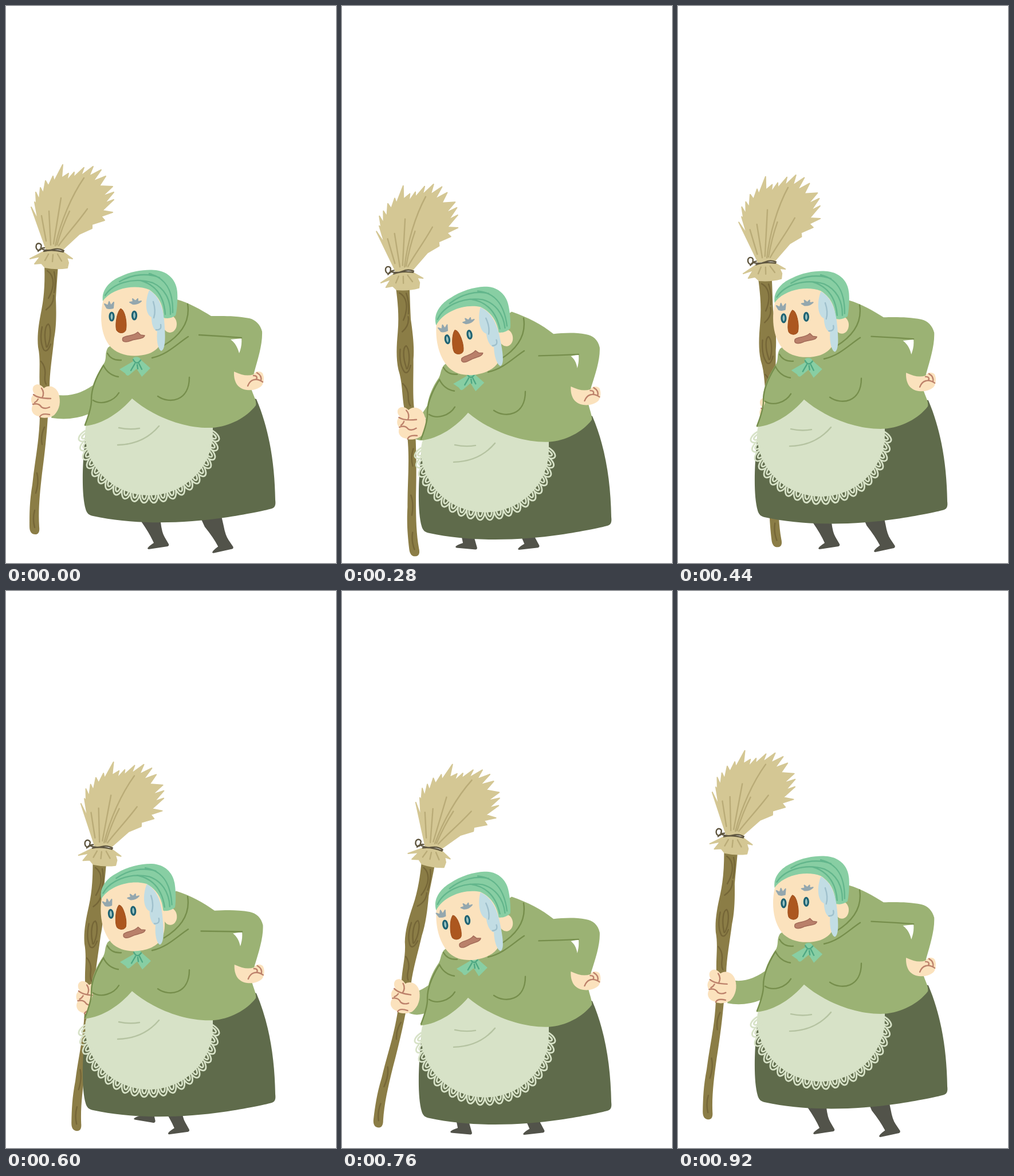
Animation of 576x972 px, one loop 0.96 s. Source, as an HTML page:

```html
<!DOCTYPE html>
<html lang="en">
<head>
<meta charset="utf-8">
<title>Walking with a broom</title>
<style>
html, body { margin: 0; width: 100%; height: 100%; overflow: hidden; background: #fff; }
svg { display: block; width: 100%; height: 100%; }
.line { fill: none; stroke-width: 2.4; stroke-linecap: round; stroke-linejoin: round; }
.skin { fill: #fbe2bd; }
.cloth { fill: #9bb274; }
.mint { fill: #88cea3; }
.fold { stroke: #768e4c; }
.crease { stroke: #bd826b; }
</style>
</head>
<body>
<svg viewBox="0 0 576 972" xmlns="http://www.w3.org/2000/svg">
  <defs>
    <path id="leg" fill="#52534a" d="M0 0Q0 -3 11 -10Q4 -26 -10 -46L-22 -78H18L23 -46Q25 -28 30 -20L37 -8Q38 -5 35 -4L2 1Z"/>
  </defs>

  <g id="broom">
    <path fill="#8b7d46" d="M67 450C68 480 67 505 62 530C57 555 54 575 56 595C61 618 57 640 59 665L59 717C58 760 50 795 46 835C41 865 41 885 41 908C41 918 45 922 51 922C57 922 59 917 58 909C56 880 59 850 63 815C67 785 71 750 73 717L76 665C76 640 81 610 84 580C88 560 88 535 87 510C88 490 90 470 91 450Z"/>
    <g class="line" stroke="#756637" stroke-width="2">
      <path d="M72 462Q84 470 82 488Q80 500 74 510M84 464Q88 480 84 500M70 530Q84 520 83 505"/>
      <path d="M70 592C66 575 68 557 74 555C79 560 78 580 74 590C72 596 70 597 70 592ZM63 560Q58 585 66 600Q72 606 78 590"/>
      <path d="M61 620Q70 630 68 645Q67 655 70 660M67 735Q60 750 63 765M54 815Q58 830 52 850M50 880Q46 895 50 910"/>
    </g>
    <g fill="#d4c794" stroke="#d4c794" stroke-width="2" stroke-linejoin="round">
      <path d="M70 424L60 396L44 351L56 374L50 342L53 346L52 325L58 338L60 317L65 327L69 305L74 314L82 297L84 306L99 277L97 300L109 292L106 305L119 290L118 299L136 282L131 296L152 280L145 297L166 286L152 306L174 297L163 314L186 315L168 332L188 325L172 344L188 338L168 357L186 360L166 367L172 374L150 381L150 388L128 398L100 424Z"/>
      <path d="M67 428L42 441L60 437L50 450L62 449L68 456Q88 460 107 457L109 448L106 439L116 441L98 428Z"/>
    </g>
    <path class="line" stroke="#b9ab77" d="M86 418C96 375 114 332 136 300M78 417L75 358M83 415L96 335M92 418C106 398 122 382 142 354M89 417Q98 385 111 358M70 410L62 366M74 433L68 444M82 434L81 446M90 433L97 445"/>
    <path class="line" stroke="#5f563f" stroke-width="3" d="M62 424Q72 428 82 425T101 427M66 428Q80 424 100 429M61 424C57 430 51 424 53 417C56 412 64 415 61 421ZM56 428Q60 422 67 422"/>
  </g>

  <path id="arm" fill="none" stroke="#9bb274" stroke-width="41"/>

  <g id="fist">
    <path class="skin" d="M50 662C56 658 62 662 66 667C74 660 88 664 92 677C96 690 94 704 84 714C74 720 62 720 57 716C46 714 42 704 47 696C42 690 43 680 50 677C45 672 46 664 50 662Z"/>
    <path class="line crease" d="M62 667Q68 675 63 684M48 678Q56 685 78 685M47 695Q57 692 62 700Q68 704 76 700M59 717Q62 710 76 713M56 686Q54 690 50 692"/>
  </g>

  <use id="legA" href="#leg"/>
  <use id="legB" href="#leg"/>

  <g id="skirt">
    <path fill="#5f6b4b" d="M141 730C133 790 131 850 139 878C141 886 146 889 152 890C225 906 310 903 380 893C420 887 450 881 464 877C470 875 471 870 470 862C469 800 460 740 437 686L300 640L160 690Z"/>
    <path fill="#d7e2c7" d="M141 728Q138 736 138 745A111.5 109 0 0 0 361 745V728L300 680L220 660Z"/>
    <path id="lace" class="line" stroke="#d7e2c7" style="stroke-width:2.8"/>
    <path class="line" stroke="#b5c3a1" d="M197 736Q215 740 233 737M195 766Q240 765 267 733"/>
  </g>

  <path id="shawl" class="cloth" fill-rule="evenodd"/>
  <path id="sleeve" class="line fold"/>
  <g id="folds" class="line fold">
    <path d="M177 606Q184 619 201 618M170 627Q178 644 196 647M255 614C282 608 298 590 318 577M317 520C321 545 312 570 276 592M265 681C285 695 320 690 320 648M152 688C166 697 188 690 197 675M169 629C155 652 149 670 149 686Q150 700 138 731"/>
  </g>

  <g id="palm">
    <path class="skin" d="M398 638Q405 641 411 643Q422 646 432 643C436 636 444 637 448 641C452 650 449 660 446 663C438 670 428 671 420 670C404 668 397 655 398 638Z"/>
    <path class="line crease" d="M422 663C426 652 436 648 448 656M432 645Q440 645 437 652M438 640Q447 645 445 654"/>
  </g>

  <g id="bow">
    <path class="mint" d="M222 614C228 611 234 613 235 617L252 632L237 647L228 633L215 644Q211 647 208 641L198 634L222 620Z"/>
    <path class="line" stroke="#4fa883" d="M222 617Q228 628 235 618M225 624L218 636M229 626L230 633M232 624L237 634"/>
  </g>

  <g id="head">
    <ellipse class="skin" cx="286" cy="555" rx="12" ry="15"/>
    <path class="skin" d="M172 505C164 530 162 567 180 592C195 611 225 614 248 607C268 600 276 585 276 560L280 500L230 480Z"/>
    <path class="mint" d="M169 515C166 495 182 479 200 472C220 462 245 459 262 461C285 464 298 480 299 500C300 515 298 533 296 540Q286 547 275 544C275 520 265 505 250 495C225 485 185 492 169 515Z"/>
    <path class="line" stroke="#63b68c" d="M173 505C186 485 220 472 256 483C276 492 288 512 287 538M198 481C222 467 248 466 268 474M250 467C278 474 292 495 291 535M235 479C262 487 276 508 278 538"/>
    <g id="hair">
      <path fill="#c2dde4" d="M250 496C242 515 243 538 254 543C254 555 257 565 264 568C262 585 266 600 271 602C278 600 279 580 276 548C274 525 266 505 250 496Z"/>
      <path class="line" stroke="#9fc0cc" d="M257 516Q262 532 258 544M262 565Q272 566 270 556"/>
    </g>
    <g id="face">
      <g fill="#94a7ae" stroke="#94a7ae" stroke-width="2" stroke-linejoin="round">
        <path d="M172 520L178 523L180 516L183 523L188 517L187 527Q180 529 176 527Z"/>
        <path d="M216 517L222 516L221 511L226 515L230 511L230 516L236 515Q230 521 221 520Z"/>
      </g>
      <g fill="#9cc3c0" stroke="#1f6373" stroke-width="3.2">
        <ellipse cx="184.5" cy="542" rx="3.5" ry="7"/>
        <ellipse cx="224" cy="540" rx="3.5" ry="7"/>
      </g>
      <path fill="#ac571f" stroke="#9e4e1b" d="M200 528C193 535 190 558 193 566C197 572 206 572 209 566C212 555 208 530 200 528Z"/>
      <path fill="#b9806a" stroke="#a36c59" stroke-width="1.5" stroke-linejoin="round" d="M204 579C209 574 222 577 230 569L235 574L242 575C240 582 226 580 218 584C208 588 201 586 204 579Z"/>
    </g>
  </g>
</svg>
<script>
const LOOP = 960, STEP = 40;
const $ = id => document.getElementById(id);
const put = (id, value) => $(id).setAttribute('transform', value);

// Blend two paths that share one structure.
function blend(a, b) {
  const to = b.match(/-?[\d.]+/g).map(Number);
  return k => {
    let i = 0;
    return a.replace(/-?[\d.]+/g, n => (+n + (to[i++] - n) * k).toFixed(2));
  };
}

// Smooth periodic curve through [time, value] keys, without overshoot.
function track(keys) {
  const n = keys.length;
  const at = i => {
    const turn = Math.floor(i / n), [t, v] = keys[i - turn * n];
    return [t + turn * LOOP, v];
  };
  const slope = i => (at(i + 1)[1] - at(i)[1]) / (at(i + 1)[0] - at(i)[0]);
  const tangent = i => {
    const a = slope(i - 1), b = slope(i);
    return a * b <= 0 ? 0 : 2 * a * b / (a + b);
  };
  return time => {
    const t = time % LOOP;
    let i = n - 1;
    while (at(i)[0] > t) i--;
    const [t0, v0] = at(i), [t1, v1] = at(i + 1), d = t1 - t0;
    const u = (t - t0) / d, w = 1 - u;
    return v0 * (1 + 2 * u) * w * w + v1 * u * u * (3 - 2 * u)
      + d * u * w * (tangent(i) * w - tangent(i + 1) * u);
  };
}

const broomTimes = [0, 160, 280, 440, 600, 760, 920];
const broomTrack = values => track(values.map((v, i) => [broomTimes[i], v]));
const broomX = broomTrack([80, 70, 104, 150, 165, 155, 94]);
const broomY = broomTrack([426, 455, 464, 448, 447, 448, 427]);
const broomLean = broomTrack([0, -6.2, -6.2, -6.2, 1.4, 7.3, 1.4]);

const footX = track([[0, 247], [280, 307], [440, 342], [480, 351], [600, 223], [640, 208], [760, 189], [920, 236]]);
const footY = track([[0, 947], [280, 948], [440, 952], [480, 954], [600, 921], [640, 926], [760, 944], [920, 947]]);
const footTilt = track([[0, 0], [280, 2], [480, -4], [600, 18], [760, 14], [920, 0]]);

const shawl = blend(
  'M178 596C172 606 176 612 172 622C160 640 149 660 148 684L152 690L137 733C170 730 200 708 220 685C255 715 310 738 360 736C390 734 420 718 436 697C438 690 432 680 428 668L433 640C440 615 448 590 447 568C444 556 436 548 425 545C400 540 375 541 358 541C340 530 320 518 298 512L230 560ZM392 582L411 580C412 590 410 598 407 606C404 595 400 588 392 582Z',
  'M177 630C171 640 173 644 168 652C158 666 148 688 148 712L152 718L137 760C170 757 200 735 220 711.5C255 741 310 764 360 762.5C390 761 420 745 436 724C437 717 432 706 430 695L435 667C443 643 451 618 450 598C447 584 438 577 426 575C405 571 385 573 370 574.5C350 558 325 545 296 535L230 580ZM400 613L413 610C414 619 413 626 411 634C409 623 406 618 400 613Z');
const sleeve = blend('M337 574Q375 576 411 579', 'M344 613Q380 612 413 610');

function lacePath(count) {
  const loop = (x, y, dx, dy, half, depth) => {
    const p = (s, e) => `${(x - dy * s + dx * e).toFixed(1)} ${(y + dx * s + dy * e).toFixed(1)}`;
    return `M${p(-half, -3)}C${p(-half, depth)} ${p(half, depth)} ${p(half, -3)}`;
  };
  let d = '';
  for (let i = 0; i < count; i++) {
    const a = Math.PI * (i + 0.3) / (count - 0.4);
    const c = Math.cos(a), s = Math.sin(a), len = Math.hypot(c, s + 0.6);
    const x = 249.5 + 110 * c, y = 745 + 108 * s;
    d += loop(x, y, c / len, (s + 0.6) / len, 8, 20);
    d += loop(x, y, c / len, (s + 0.6) / len, 4, 12);
  }
  return d;
}
$('lace').setAttribute('d', lacePath(22));

function placeLeg(id, t, shift) {
  put(id, `translate(${footX(t) + shift} ${footY(t)}) rotate(${footTilt(t)})`);
}

function draw(t) {
  const phase = t / LOOP * 4 * Math.PI;
  const k = (1 - Math.cos(phase)) / 2;
  const second = t >= LOOP / 2;

  const x = broomX(t), y = broomY(t), lean = broomLean(t);
  const hold = `translate(${x - 80} ${y - 426}) rotate(${lean} 80 426)`;
  put('broom', hold);
  put('fist', hold);
  const r = lean * Math.PI / 180;
  const hx = x - 10.5 * Math.cos(r) - 263.5 * Math.sin(r);
  const hy = y - 10.5 * Math.sin(r) + 263.5 * Math.cos(r);
  $('arm').setAttribute('d', `M${hx + 13} ${hy + 9}Q${Math.max(130, hx + 25)} ${hy + 17} 172 ${672 + 28 * k}`);

  placeLeg('legA', t, 0);
  placeLeg('legB', t + LOOP / 2, 9);

  put('skirt', `translate(0 ${32 * k})`);
  $('shawl').setAttribute('d', shawl(k));
  $('sleeve').setAttribute('d', sleeve(k));
  put('folds', `translate(0 ${26.5 * k})`);
  put('palm', `translate(${1.5 * k} ${28 * k})`);
  put('bow', `translate(${(second ? 2 : -4) * k} ${27 * k})`);

  put('head', `translate(${-1.6 * k} ${35 * k}) rotate(${-9.5 * k} 230 540)`);
  put('hair', `rotate(${2.5 * Math.sin(phase) + 2.5 * k} 256 500)`);
  put('face', `translate(${second ? -4.2 * k * k : 0} 0)`);
}

const start = performance.now();
function tick(now) {
  const t = Math.max(0, now - start) % LOOP;
  draw(Math.floor(t / STEP) * STEP);
  requestAnimationFrame(tick);
}
draw(0);
requestAnimationFrame(tick);
</script>
</body>
</html>
```
